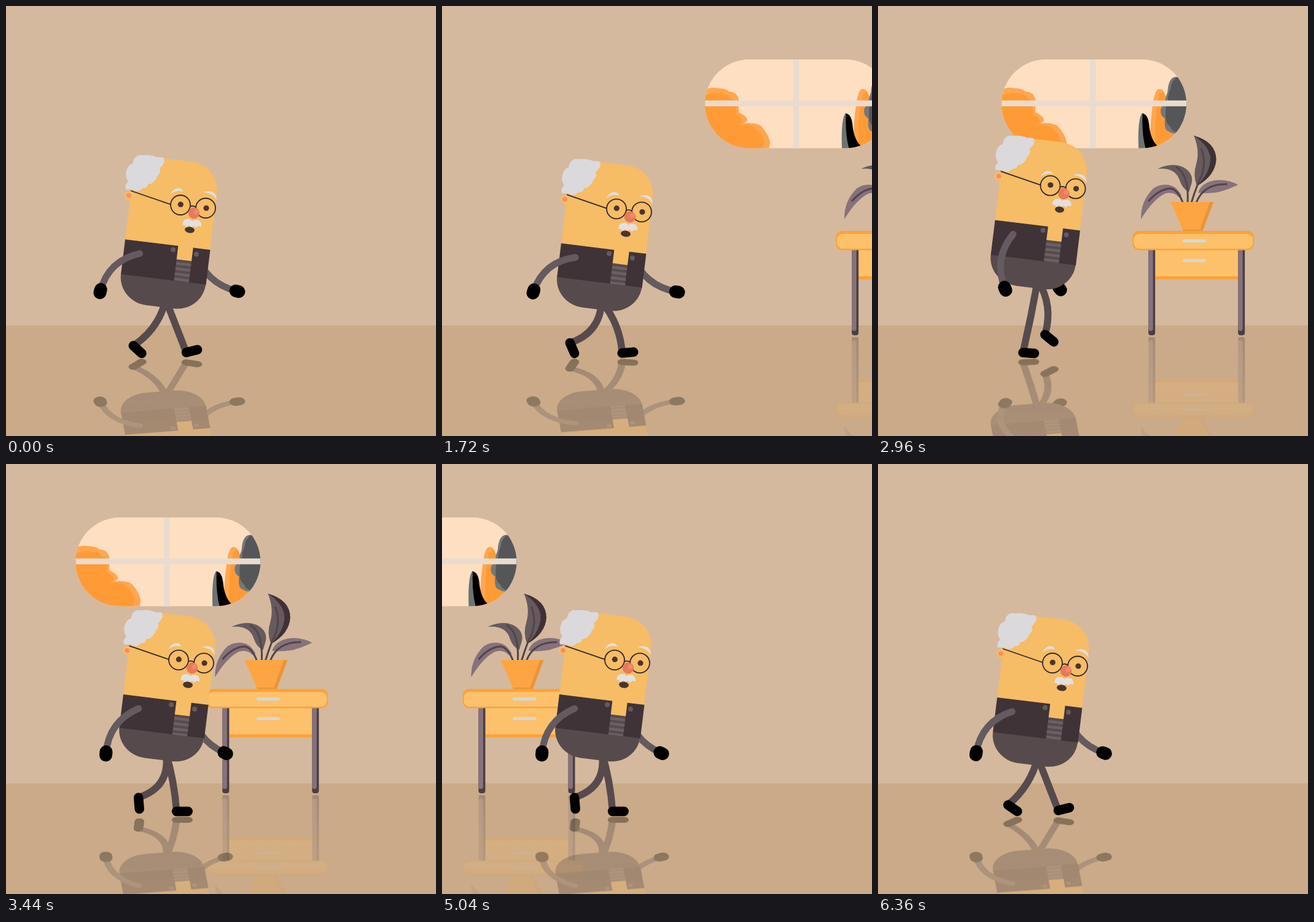
Write an HTML page that moves like this. It is 700 px wide and 700 px high and loops after 6400 ms.

```html
<!DOCTYPE html>
<html lang="en">
<head>
<meta charset="utf-8">
<title>Walking man</title>
<style>
  html, body { margin: 0; width: 100%; height: 100%; overflow: hidden; background: #d5b99e; }
  svg { display: block; width: 100vw; height: 100vh; }
</style>
</head>
<body>
<svg viewBox="0 0 700 700" xmlns="http://www.w3.org/2000/svg">
  <defs>
    <clipPath id="pane"><rect x="289" y="87" width="301" height="144.500" rx="72"/></clipPath>
    <linearGradient id="fadeMan" gradientUnits="userSpaceOnUse" x1="0" y1="574" x2="0" y2="700">
      <stop stop-color="#fff" stop-opacity=".34"/><stop offset="1" stop-color="#fff" stop-opacity=".26"/>
    </linearGradient>
    <linearGradient id="fadeRoom" gradientUnits="userSpaceOnUse" x1="0" y1="538" x2="0" y2="680">
      <stop stop-color="#fff" stop-opacity=".3"/><stop offset="1" stop-color="#fff" stop-opacity=".14"/>
    </linearGradient>
    <mask id="maskMan" maskUnits="userSpaceOnUse" x="0" y="520" width="700" height="180">
      <rect y="520" width="700" height="180" fill="url(#fadeMan)"/>
    </mask>
    <mask id="maskRoom" maskUnits="userSpaceOnUse" x="0" y="520" width="700" height="180">
      <rect y="520" width="700" height="180" fill="url(#fadeRoom)"/>
    </mask>
    <g id="tableLeg">
      <path d="M528 397h11v135q0 4-4 4h-3q-4 0-4-4z" fill="#4b3e43"/>
      <path d="M528 397h7.500v128q0 4-3.700 4t-3.800-4z" fill="#87717b"/>
    </g>
  </defs>

  <rect width="700" height="700" fill="#d5b99e"/>
  <rect y="520" width="700" height="180" fill="#caaa88"/>

  <g mask="url(#maskRoom)"><use href="#room" transform="matrix(1 0 0 -.77 0 951.7)"/></g>
  <g id="room">
    <g clip-path="url(#pane)">
      <rect x="289" y="87" width="301" height="145" fill="#ffdfc1"/>
      <path d="M285 138Q298 131 311 134Q322 134 328 139Q341 140 344 152V173Q359 180 358 187L352 191Q371 189 380 195Q393 209 395 222L393 234H285z" fill="#ffa64f"/>
      <path d="M285 147Q306 139 316 143Q326 143 331 150Q339 152 340 162V177Q350 180 351 188L344 195Q362 190 371 199Q384 210 385 222L382 234H285z" fill="#ff9b35"/>
      <path d="M530 234Q530 200 535 160Q539 134 546 135Q554 135 556 150L565 234z" fill="#ffa64f"/>
      <path d="M540 234Q537 200 541 170Q545 138 552 139Q558 145 560 170L580 205L560 234z" fill="#ff9b35"/>
      <path d="M566 118Q574 112 578 119L580 206Q568 210 561 204Q553 203 555 183Q547 179 548 169Q549 162 555 162Q555 149 559 141Q560 124 566 118z" fill="#757778"/>
      <path d="M574 116L592 112V206L575 206Q565 203 564 197Q555 190 556 178Q555 165 560 155Q559 145 564 135Q565 122 574 116z" fill="#555657"/>
      <path d="M512 234Q510 184 518 174Q526 178 527 195L530 234z" fill="#6d7272"/>
      <path d="M524 234Q517 210 518.500 175Q527 176 529 192Q531 216 542 227L540 234z" fill="#000"/>
      <path d="M437.500 87V232M289 158.500H590" stroke="#eadbcf" stroke-width="9.500"/>
    </g>

    <path d="M516 347Q515 318 536 297Q551 287 567 293Q576 297 582 309L577 311Q570 302 556 305Q536 314 516 347z" fill="#87717b"/>
    <path d="M543 265Q566 254 584 262Q603 272 598 290L594 303Q583 297 579 284Q572 262 543 265z" fill="#665a5f"/>
    <path d="M674 291Q655 281 635 284Q614 288 609 304Q624 306 642 303Q660 298 674 291z" fill="#87717b"/>
    <path d="M602 211Q634 222 637 246Q636 274 607 293Q600 275 606 257Q612 235 602 211z" fill="#665a5f"/>
    <path d="M602 211Q638 221 638.500 250Q637 276 607 293Q630 270 629 246Q625 226 602 211z" fill="#3f3236"/>
    <g fill="none" stroke="#51444a" stroke-width="3">
      <path d="M528 318Q545 298 564 297Q576 299 584 320M573 262Q594 273 592 320M614 232Q625 260 609 288Q603 304 598 320M656 290Q618 289 606 320"/>
    </g>

    <path d="M564 319h70l-18 48h-31z" fill="#fda542"/>
    <path d="M628 319h6l-18 48h-31l-1-3h28z" fill="#e8943b"/>
    <rect x="539" y="396" width="135" height="49" fill="#faa23b"/>
    <rect x="539" y="396" width="135" height="44" fill="#fdc16c"/>
    <use href="#tableLeg"/><use href="#tableLeg" x="146"/>
    <rect x="502" y="366" width="198" height="31.500" rx="11" fill="#faa23b"/>
    <rect x="504" y="371" width="194" height="24" rx="9" fill="#fdc16c"/>
    <path d="M586 382.500H619M586 414.500H619" stroke="#d8d6d2" stroke-width="5" stroke-linecap="round"/>
  </g>

  <g mask="url(#maskMan)"><use href="#man" transform="matrix(1 0 0 -.64 0 941.2)"/></g>
  <g id="man" fill="none" stroke-linecap="round">
    <g stroke="#574a4c" stroke-width="11.500"><path id="legA"/><path id="legB"/></g>
    <g stroke="#000" stroke-width="15.500"><path id="footA"/><path id="footB"/></g>
    <path id="farArm" stroke="#645a5f" stroke-width="11"/>
    <path id="farHand" stroke="#000" stroke-width="20.500"/>

    <g id="body">
      <ellipse cx="200" cy="308.500" rx="7" ry="7" fill="#f6bc66"/>
      <g transform="translate(194 380) rotate(7)">
        <path d="M0 60V-92a47 47 0 0 1 47-47H92a47 47 0 0 1 47 47V60z" fill="#f6bc66"/>
        <path d="M86 22h27V58H86z" fill="#574a4c"/>
        <path d="M86 28.500h27M86 37h27M86 45.500h27M86 54h27" stroke="#6a6065" stroke-width="4.500" stroke-linecap="butt"/>
        <path id="vest" fill="#3f3337"/>
        <path id="belly" fill="#574a4c"/>
        <g fill="#665a5f"><circle cx="79.500" cy="7" r="4"/><circle cx="118" cy="9.700" r="4"/></g>
      </g>
      <circle cx="200" cy="308.500" r="3.800" fill="#fb8c5e"/>
      <path d="M211 247Q216 242 222 244Q235 242 246 247L255 247Q260 252 254 259L249 265Q253 270 246 276Q244 283 237 288L230 290Q231 296 222 296Q215 304 206 298L196 298Q193 292 200 286Q193 276 198 265Q200 259 207 257Q208 250 211 247z" fill="#dbd9dc" stroke="#dbd9dc" stroke-width="1.500" stroke-linejoin="round"/>
      <g id="brows" fill="#e2dedb">
        <path d="M267 307Q273 296 281 296.500Q287 297 288.500 302Q276 299 267 307z"/>
        <path d="M321 303Q330 300 337 303Q343 307 343 315Q335 304 321 303z"/>
      </g>
      <g id="openEyes" fill="#4a352d"><ellipse cx="284.300" cy="323" rx="4.600" ry="4.500"/><ellipse cx="326" cy="329" rx="4.600" ry="4.500"/></g>
      <path id="shutEyes" d="M276.500 322Q284 313 291.500 321M319 326.500Q327 319 333 328" stroke="#4a352d" stroke-width="2.500"/>
      <g stroke="#33282c" stroke-width="1.800">
        <circle cx="284" cy="324" r="16"/><circle cx="325" cy="329" r="16"/>
        <path d="M204 301L268 323M300 326.500Q305 324 309.500 328"/>
      </g>
      <g id="mouthArea">
        <path d="M287 356Q288 347 295 347Q300 346 303 350Q309 347 314 349Q319 352 318 359L313 358L309 361L306 358L302 360L298 357L294 360L291 357z" fill="#e2e0e1"/>
        <ellipse id="mouth" cx="299" cy="364.500" fill="#4a352d" transform="rotate(7 299 364.500)"/>
      </g>
      <circle cx="306" cy="337" r="9.200" fill="#e67a59"/>
      <circle cx="309.500" cy="335" r="4" fill="#f18a6a"/>
    </g>

    <path id="nearArm" stroke="#645a5f" stroke-width="11"/>
    <path id="nearHand" stroke="#000" stroke-width="21"/>
  </g>
</svg>

<script>
const LOOP = 6400, STRIDE = 1600, STEP = 800, TICK = 40, SPEED = .183;
const $ = id => document.getElementById(id);
const set = (id, attrs) => { for (const k in attrs) $(id).setAttribute(k, attrs[k]); };

const ramp = (from, to, t) => Math.min(1, Math.max(0, (t - from) / (to - from)));
const ease = (from, to, t) => { const u = ramp(from, to, t); return u * u * (3 - 2 * u); };
const bump = (from, to, t) => Math.sin(Math.PI * ramp(from, to, t)) ** 2;

// Control point of a limb whose middle is pushed sideways by bend.
function elbow(x0, y0, x1, y1, bend) {
  const dx = x1 - x0, dy = y1 - y0, k = 2 * bend / Math.hypot(dx, dy);
  return [(x0 + x1) / 2 - dy * k, (y0 + y1) / 2 + dx * k];
}

function drawArm(name, sx, sy, hx, hy) {
  const [cx, cy] = elbow(sx, sy, hx, hy, 13.5);
  const k = 2.7 / Math.hypot(hx - cx, hy - cy), ux = (hx - cx) * k, uy = (hy - cy) * k;
  set(name + 'Arm', { d: `M${sx} ${sy}Q${cx} ${cy} ${hx} ${hy}` });
  set(name + 'Hand', { d: `M${hx - ux} ${hy - uy}L${hx + ux} ${hy + uy}` });
}

// Both arms are pendulums in opposite phase; hands rise towards the ends.
function drawArms(phase, x, y) {
  const wave = Math.cos((phase - 85) / STRIDE * 2 * Math.PI);
  const swing = Math.sign(wave) * Math.abs(wave) ** 1.3, rise = wave ** 4;
  const handY = y + 492;
  drawArm('far', x + 280 + 30 * swing, y + 399, x + 278 + 106 * swing, handY - rise * (46 - 12 * wave));
  drawArm('near', x + 225 - 8 * swing, y + 403, x + 226 - 78 * swing, handY - rise * 35);
}

// Slide back on the floor, roll onto the toe, swing forward, land on the heel.
function drawLeg(side, t, hipY) {
  const roll = ease(480, 1160, t) - ease(1160, 1560, t);
  const heel = ease(1160, 1560, t) + 1 - ease(0, 200, t);
  const angle = (93 * roll - 14 * heel) * Math.PI / 180;
  const ux = 9.3 * Math.cos(angle), uy = 9.3 * Math.sin(angle);
  const x = 302.5 + 90.5 * (ease(960, 1560, t) - ramp(120, 816, t));
  const y = 565.5 - Math.abs(uy) - 1.5 * heel - 24 * bump(960, 1560, t);
  const bend = 20 * roll + 8 * bump(0, 300, t);
  const [cx, cy] = elbow(260, hipY, x - ux, y - uy, -bend);
  set('leg' + side, { d: `M260 ${hipY}Q${cx} ${cy} ${x - ux} ${y - uy}` });
  set('foot' + side, { d: `M${x - ux} ${y - uy}L${x + ux} ${y + uy}` });
}

function drawBody(phase, x, y, squash) {
  const belt = 57 - squash * .6, base = 102 - squash;
  set('body', { transform: `translate(${x} ${y})` });
  set('vest', { d: `M0 0H87V${belt + 1}H0zM111.500 0H139.500V${belt + 1}H111.500z` });
  set('belly', { d: `M0 ${belt}V${base - 45}a47 45 0 0 0 47 45H92a47 45 0 0 0 47 -45V${belt}z` });

  const squint = ease(240, 800, phase) - ease(1160, 1560, phase);
  const shut = phase >= 800 && phase < 1040;
  set('brows', { transform: `translate(0 ${7 * squint})` });
  set('mouthArea', { transform: `translate(0 ${-3 * squint})` });
  set('mouth', { rx: 8 - squint, ry: 5 + 2 * bump(960, 1360, phase) });
  set('openEyes', { visibility: shut ? 'hidden' : 'visible' });
  set('shutEyes', { visibility: shut ? 'visible' : 'hidden' });
}

function render(time) {
  const phase = time % STRIDE, step = time % STEP;
  const y = 6.3 * bump(0, 240, step) - 36.5 * (ease(180, 440, step) - ease(500, 760, step));
  const x = 15 * bump(600, 1160, phase) - 4 * (ease(120, 300, phase) - ease(1300, 1560, phase));
  const squash = 4 * bump(0, 400, step), hipY = 478 + y - squash;

  set('room', { transform: `translate(${(2480 - time) * SPEED} 0)` });
  drawLeg('A', phase, hipY);
  drawLeg('B', (phase + STEP) % STRIDE, hipY);
  drawArms(phase, x, y);
  drawBody(phase, x, y, squash);
}

const start = performance.now();
function frame() {
  const t = (performance.now() - start) % LOOP;
  render(Math.floor(t / TICK) * TICK);
  requestAnimationFrame(frame);
}
render(0);
requestAnimationFrame(frame);
</script>
</body>
</html>
```
